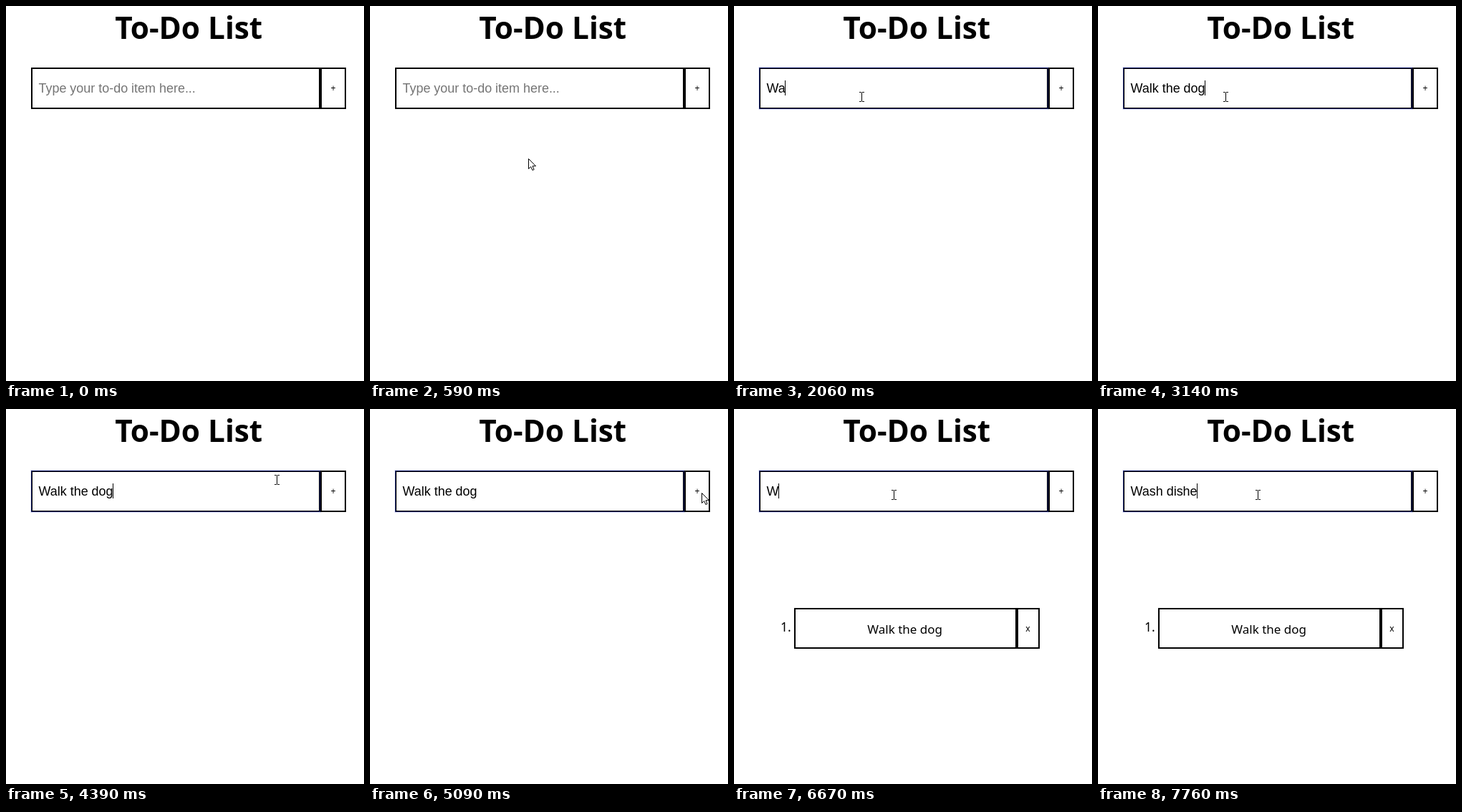
These frames come from a looping animation (500 by 524 pixels, 7990 ms). An HTML page with a canvas:

```html
<!DOCTYPE html>
<html lang="en">
<head>
<meta charset="utf-8">
<title>To-Do List</title>
<style>
  html, body { margin: 0; width: 100%; height: 100%; overflow: hidden; background: #fff; }
  canvas { display: block; width: 500px; height: 524px; }
</style>
</head>
<body>
<canvas id="stage"></canvas>
<script>
const LOOP = 7990, W = 500, H = 524, BLINK = 510;
const UI = '"Noto Sans", "Open Sans", sans-serif';
const ARIAL = '"Liberation Sans", Arial, sans-serif';
const FOCUS = 1370, CLICK_ADD = 5260, ADDED = 5340, REFOCUS = 6060;

const field = { x: 35, y: 86, w: 404, h: 58 };
const addButton = { x: 439, y: 86, w: 36, h: 58 };
const item = { x: 84, y: 278, w: 311, h: 57 };
const removeButton = { x: 395, y: 278, w: 32, h: 57 };

// Each burst types its text one letter per gap.
const bursts = [
  { text: 'Walk', start: 1890, gap: 140 },
  { text: ' the ', start: 2520, gap: 75 },
  { text: 'dog', start: 2990, gap: 75 },
  { text: 'Wash ', start: 6670, gap: 112 },
  { text: 'dishes', start: 7290, gap: 117 }
];

// Each glide continues from where the one before it ended.
const entry = { x: 302, y: 406, time: 130 };
const glides = [
  { start: 130, end: 820, x: 193, y: 146 },
  { start: 1010, end: 1190, x: 178, y: 127 },
  { start: 3680, end: 4380, x: 378, y: 99 },
  { start: 4420, end: 5080, x: 463, y: 117 },
  { start: 5500, end: 5740, x: 223, y: 120 }
];

const canvas = document.getElementById('stage');
const ctx = canvas.getContext('2d');
const dpr = window.devicePixelRatio || 1;
canvas.width = W * dpr;
canvas.height = H * dpr;

const clamp = (v, lo, hi) => Math.min(hi, Math.max(lo, v));
const smooth = u => u * u * (3 - 2 * u);

function label(str, x, y, font, align = 'left', color = '#000') {
  ctx.font = font;
  ctx.textAlign = align;
  ctx.fillStyle = color;
  ctx.fillText(str, x, y);
}

function outline({ x, y, w, h }, inset, width, color) {
  ctx.strokeStyle = color;
  ctx.lineWidth = width;
  ctx.strokeRect(x + inset, y + inset, w - 2 * inset, h - 2 * inset);
}

function box(rect, focused) {
  outline(rect, 1, 2, '#000');
  if (!focused) return;
  outline(rect, 0.5, 1, '#101a60');
  outline(rect, -0.5, 1, 'rgba(70, 80, 200, 0.12)');
}

// The text in the field and the time of its last key.
function typing(t) {
  const from = t < ADDED ? 0 : ADDED, until = t < ADDED ? ADDED : LOOP;
  let text = '', last = from ? REFOCUS - 50 : FOCUS - 50;
  for (const b of bursts) {
    if (b.start < from || b.start >= until || t < b.start) continue;
    const count = clamp(Math.floor((t - b.start) / b.gap) + 1, 0, b.text.length);
    text += b.text.slice(0, count);
    last = b.start + (count - 1) * b.gap;
  }
  return { text, last };
}

function pointerAt(t) {
  let { x, y } = entry;
  for (const g of glides) {
    const u = smooth(clamp((t - g.start) / (g.end - g.start), 0, 1));
    x += (g.x - x) * u;
    y += (g.y - y) * u;
  }
  return [Math.round(x), Math.round(y)];
}

function beam(x, y) {
  ctx.fillStyle = '#000';
  ctx.fillRect(x, y - 6, 1, 12);
  for (const dy of [-7, 6]) {
    ctx.fillRect(x - 3, y + dy, 3, 1);
    ctx.fillRect(x + 1, y + dy, 3, 1);
  }
}

function arrow(x, y) {
  ctx.save();
  ctx.translate(x + 0.5, y + 0.5);
  const shape = new Path2D('M0 0V14L3.2 11L5.4 16L7.6 15L5.5 10.2H10Z');
  ctx.fillStyle = '#fff';
  ctx.fill(shape);
  ctx.strokeStyle = '#000';
  ctx.lineWidth = 1;
  ctx.stroke(shape);
  ctx.restore();
}

function drawPointer(t) {
  if (t < entry.time) return;
  const [x, y] = pointerAt(t);
  const overField = x < field.x + field.w && y < field.y + field.h;
  (overField ? beam : arrow)(x, y);
}

function drawField(t) {
  const focused = t >= FOCUS && t < CLICK_ADD || t >= REFOCUS;
  box(field, focused);
  box(addButton, t >= CLICK_ADD && t < REFOCUS);
  label('+', 457, 118.5, '12px ' + ARIAL, 'center');

  const { text, last } = typing(t);
  label(text || 'Type your to-do item here...', 45.5, 121, '17.95px ' + ARIAL,
    'left', text ? '#000' : '#757575');
  if (focused && (t - last) % (2 * BLINK) < BLINK) {
    const width = text ? ctx.measureText(text).width : 1;
    ctx.fillStyle = '#000';
    ctx.fillRect(Math.floor(45.1 + width), 104, 1, 21);
  }
}

function drawItem() {
  label('1.', 65, 311, '17.5px ' + UI);
  box(item);
  box(removeButton);
  label('Walk the dog', 238.7, 314, '17px ' + UI, 'center');
  label('x', 410.3, 311, '12px ' + UI, 'center');
}

function draw(t) {
  ctx.setTransform(dpr, 0, 0, dpr, 0, 0);
  ctx.fillStyle = '#fff';
  ctx.fillRect(0, 0, W, H);
  label('To-Do List', 255.2, 46, '700 42.3px ' + UI, 'center');
  drawField(t);
  if (t >= ADDED) drawItem();
  drawPointer(t);
}

const begin = performance.now();
function tick() {
  draw((performance.now() - begin) % LOOP);
  requestAnimationFrame(tick);
}
tick();
</script>
</body>
</html>
```
